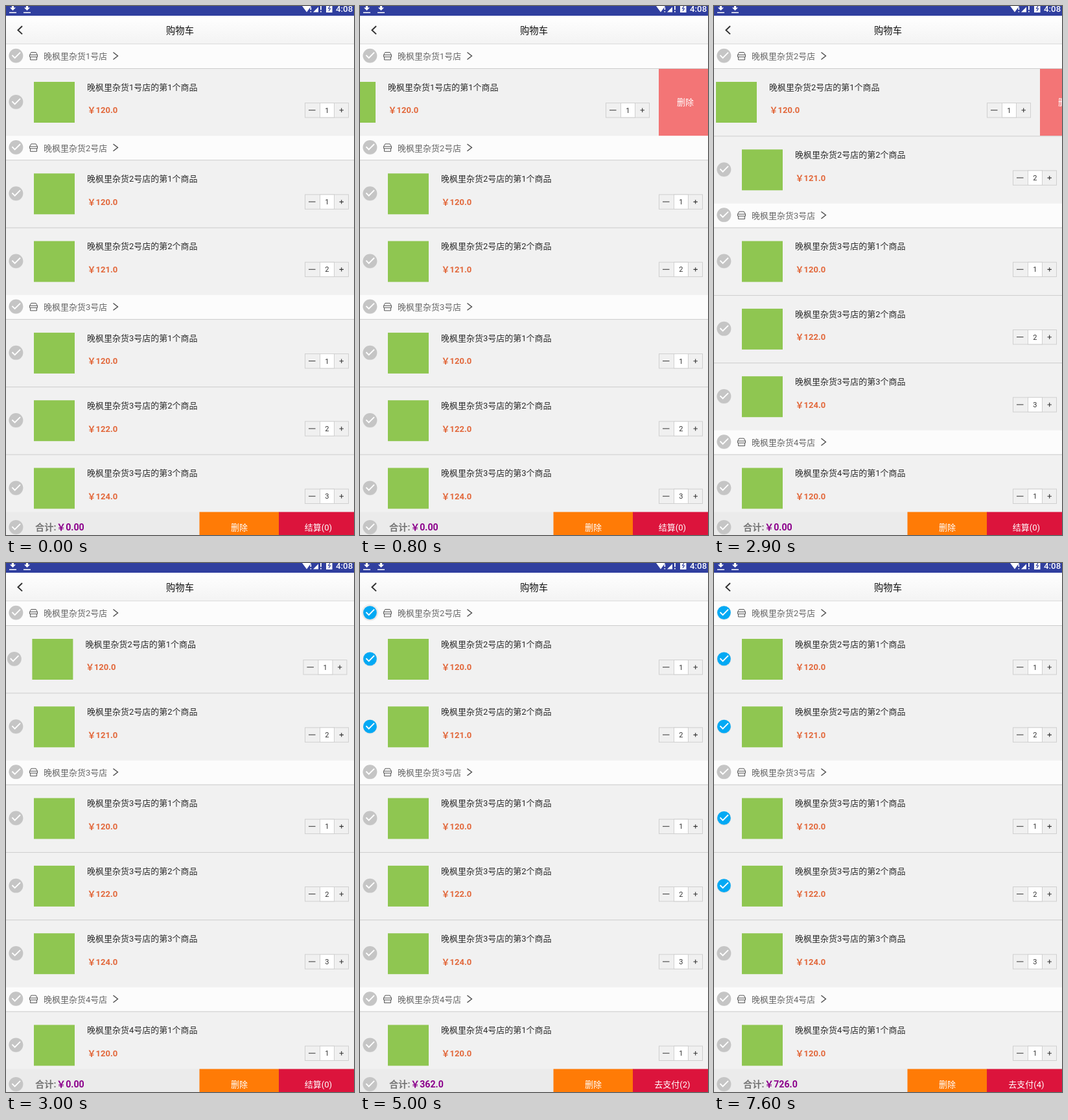
Write an HTML page that moves like this. It is 537 by 816 pixels and loops after 8 s.

```html
<!DOCTYPE html>
<html lang="zh-CN">
<head>
<meta charset="utf-8">
<style>
  html, body { margin: 0; width: 100%; height: 100%; overflow: hidden; background: #f1f1f1; }
  svg { display: block; font: 13px Roboto, "Noto Sans CJK SC", "Noto Sans CJK", sans-serif; }
</style>
</head>
<body>
<svg id="stage" width="537" height="816" viewBox="0 0 537 816"></svg>
<script>
const LOOP = 8000, STEP = 100;
const HEAD_H = 37, ITEM_H = 104.3, TOP = 59, DELETED_AT = 2900;
const SHOP = '晚枫里杂货';

// Each item: price, quantity, time at which it gets ticked
const shops = [
  { no: 1, items: [[120, 1]] },
  { no: 2, ticked: 5000, items: [[120, 1, 5000], [121, 2, 5000]] },
  { no: 3, items: [[120, 1, 6500], [122, 2, 7300], [124, 3]] },
  { no: 4, items: [[120, 1]] }
];

// Swipe distance of the top item: [time, pixels]
const swipe = [[400, 0], [500, 14], [600, 43], [700, 70], [800, 82], [2700, 82],
  [2800, 66], [2900, 40], [3000, 2.6], [3100, 0], [LOOP, 0]];

function swipeAt(t) {
  if (t <= swipe[0][0]) return 0;
  const i = swipe.findIndex(k => k[0] >= t);
  const [t0, a] = swipe[i - 1], [t1, b] = swipe[i];
  return a + (b - a) * (t - t0) / (t1 - t0);
}

const rect = (x, y, w, h, fill, extra = '') =>
  `<rect x="${x}" y="${y}" width="${w}" height="${h}" fill="${fill}" ${extra}/>`;
const line = (d, color, width = 1) =>
  `<path d="${d}" fill="none" stroke="${color}" stroke-width="${width}"/>`;
const text = (x, y, s, fill, extra = '') =>
  `<text x="${x}" y="${y}" fill="${fill}" ${extra}>${s}</text>`;
const at = (x, y, body) => `<g transform="translate(${x} ${y})">${body}</g>`;
const MID = 'text-anchor="middle"';

function check(y, t, ticked = Infinity, glow = 0) {
  const on = t >= ticked;
  const halo = on && t < ticked + glow ? '<circle r="13" fill="#000" opacity=".06"/>' : '';
  const disc = on ? '<circle r="10.4" fill="#03a9f4"/>' : '<circle r="10.9" fill="#c5c5c5"/>';
  return at(15.4, y, halo + '<circle cy=".6" r="11" fill="#000" opacity=".06"/>' + disc +
    line('M-6 -.7l4.2 4.2l8.4 -8.4', '#fff', 1.9));
}

function header(shop, y, t) {
  return at(0, y,
    rect(0, 0, 537, HEAD_H, '#fcfcfc') +
    check(17.6, t, shop.ticked, 200) +
    line('M38.8 12.5h7.4l2.3 4v3h-12v-3zM36.5 16.5h12M37.5 19.5v4.5h10v-4.5', '#555') +
    text(58, 23.3, `${SHOP}${shop.no}号店`, '#666') +
    line('M165.5 12.6l7 5.4l-7 5.4', '#444', 1.3));
}

function stepper(count) {
  return rect(461.5, 53.6, 67, 22.4, '#f0f0f0', 'stroke="#d0d0d0"') +
    rect(484.5, 53.6, 22, 22.4, '#fff', 'stroke="#d0d0d0"') +
    line('M467 64.7h10.5', '#444', 1.1) +
    line('M514.5 64.8h6.4M517.7 61.6v6.4', '#333', 1.1) +
    text(495.3, 68.8, count, '#333', MID + ' font-size="11"');
}

function item(shop, index, y, t, shift) {
  const [price, count, ticked] = shop.items[index];
  const glow = shop.ticked ? 0 : ticked === 6500 ? 100 : 200;
  const content = check(51.8, t, ticked, glow) +
    rect(43, 21, 63, 63, '#8fc651') +
    text(125, 33.8, `${SHOP}${shop.no}号店的第${index + 1}个商品`, '#2b2b2b') +
    text(125.5, 69.4, `￥${price.toFixed(1)}`, '#e2673a', 'font-weight="bold"') +
    stepper(count) +
    rect(543, 0, 82, ITEM_H, '#f37576') +
    text(584, 57, '删除', '#fff', MID);
  return at(0, y, rect(0, 0, 537, ITEM_H, '#f1f1f1') +
    at(-shift, 0, content) + rect(0, 0, 537, 1, '#cdcdcd'));
}

function list(t) {
  let y = TOP, out = '', shift = swipeAt(t);
  for (const shop of shops.slice(t >= DELETED_AT ? 1 : 0)) {
    out += header(shop, y, t);
    y += HEAD_H;
    shop.items.forEach((_, i) => {
      out += item(shop, i, y, t, shift);
      shift = 0;
      y += ITEM_H;
    });
  }
  return out;
}

function topBars() {
  const download = x => `<path d="M${x - 1.6} 0h3.2v2.5h3l-4.6 4.6l-4.6 -4.6h3zM${x - 5.5} 9.4h11v1.5h-11z" fill="#fff"/>`;
  return `<linearGradient id="bar" x2="0" y2="1"><stop stop-color="#fff"/><stop offset="1" stop-color="#f3f3f3"/></linearGradient>` +
    rect(0, 15, 537, 43.5, 'url(#bar)') + rect(0, 58, 537, 1, '#dcdcdc') +
    rect(0, 0, 537, 15, '#303f9f') + download(10.5) + download(32.5) +
    `<path d="M457 0h14l-7 9.5zM469.5 2h1.6v4h-1.6zm0 6h1.6v1.6h-1.6zM474 9.6l8 -8v8zM485 0h1.8v6h-1.8zm0 7.8h1.8v1.8h-1.8zM494 0h9.5v10h-9.5z" fill="#fff"/>` +
    line('M500 0l-2.5 4h3l-2.5 4', '#303f9f', 1.2) +
    text(509, 9.3, '4:08', '#fff', 'font-weight="500" font-size="13.3"') +
    line('M25 31l-6.5 6.2l6.5 6.2', '#333', 2) +
    text(268.5, 42.8, '购物车', '#111', MID + ' font-size="14.3" font-weight="500"');
}

function bottomBar(t) {
  const chosen = shops.flatMap(s => s.items).filter(i => t >= i[2]);
  const total = chosen.reduce((sum, [price, count]) => sum + price * count, 0);
  const bold = 'font-size="14.2" font-weight="bold"';
  return rect(0, 780.5, 537, 36, '#ebebeb') + check(803.8, t) +
    text(45, 809, '合计:', '#777', bold) +
    text(78, 809, '￥' + (total ? total.toFixed(1) : '0.00'), '#8b008b', bold) +
    rect(298.5, 780.5, 123, 36, '#ff7b06') + text(360, 808.8, '删除', '#fff', MID) +
    rect(421, 780.5, 116, 36, '#dc143c') +
    text(482, 808.8, `${chosen.length ? '去支付' : '结算'}(${chosen.length})`, '#fff', MID);
}

const stage = document.getElementById('stage');
const start = performance.now();
let shown = -1;

function frame() {
  const t = Math.floor((performance.now() - start) % LOOP / STEP) * STEP;
  if (t !== shown) {
    shown = t;
    stage.innerHTML = list(t) + topBars() + bottomBar(t);
  }
  requestAnimationFrame(frame);
}
frame();
</script>
</body>
</html>
```
